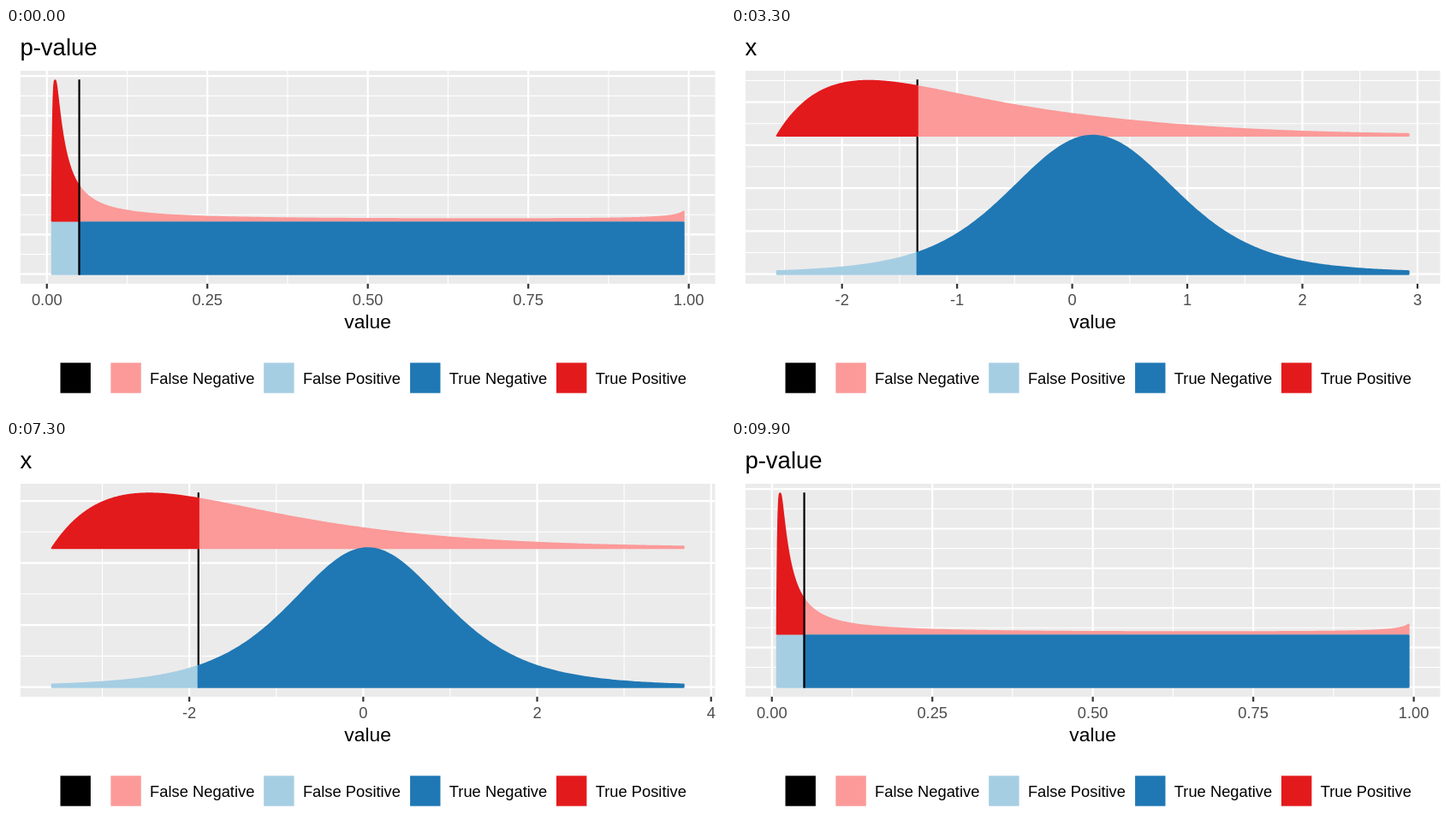
Animation, 840 px wide and 450 px high, one loop 10000 ms. Source, as an HTML page:

```html
<!DOCTYPE html>
<html lang="en">
<head>
<meta charset="utf-8">
<title>p-value</title>
<style>
  html, body { margin: 0; width: 100%; height: 100%; overflow: hidden; background: #fff; }
  svg { display: block; }
  text { font-family: "Liberation Sans", Arial, sans-serif; font-size: 18.33px; }
  .title { font-size: 27.5px; }
  .label { font-size: 22.9px; }
  .tick { fill: #4d4d4d; text-anchor: middle; }
</style>
</head>
<body>
<svg width="840" height="450" viewBox="0 0 840 450">
  <text class="title" id="title" x="16.4" y="32"></text>
  <g id="plot"></g>
  <text class="label" x="422.7" y="351" text-anchor="middle">value</text>
  <g id="legend"></g>
</svg>
<script>
const FALSE_NEG = '#FB9A99', FALSE_POS = '#A6CEE3', TRUE_NEG = '#1F78B4', TRUE_POS = '#E31A1C';
const LINE = 2.2;
const panel = { left: 16.9, right: 828.5, top: 50, bottom: 298.9 };
const byId = id => document.getElementById(id);
const mix = (a, b, e) => a + (b - a) * e;

// Student t with 4 degrees of freedom against a gamma(2, 0.8) that starts at -4.
const tShape = x => (1 + x * x / 4) ** -2.5;
const tCdf = x => {
  const s = 1 + x * x / 4;
  return 0.5 + 0.375 * x / Math.sqrt(s) * (1 - x * x / s / 12);
};
const altShape = x => 0.8 * (x + 4) * Math.exp(1 - 0.8 * (x + 4));

// Each curve as [height on the p-value scale, height on the x scale].
const nullHeight = x => [0.01302, 2.5 * tShape(x)];
const altBase = [0.01342, 2.5];
const altHeight = x => [
  altBase[0] + 0.00146 * altShape(x) / tShape(x),
  altBase[1] + 0.981 * altShape(x)
];
const total = [0.0489, 3.481];
const MIN = -4, CUT = -2.124, MAX = 4;

// Step and ends of the best axis labels (Talbot's extended Wilkinson search, five wanted).
function axisBreaks(lo, hi) {
  const nice = [1, 5, 2, 2.5, 4, 3], span = hi - lo;
  let best = { score: -Infinity };
  nice.forEach((q, i) => {
    for (let count = 2; count <= 10; count++) {
      const first = Math.ceil(Math.log10(span / (count + 1) / q));
      for (let z = first; z < first + 2; z++) {
        const step = q * 10 ** z;
        const last = Math.ceil(lo / step);
        for (let n = Math.floor(hi / step) - count + 1; n <= last; n++) {
          const from = n * step, to = (n + count - 1) * step;
          const simplicity = (from <= 0 && to >= 0 ? 1 : 0) - i / 5;
          const coverage = 1 - 0.5 * ((hi - to) ** 2 + (lo - from) ** 2) / (0.1 * span) ** 2;
          const ratio = (count - 1) / (to - from) * (Math.max(to, hi) - Math.min(from, lo)) / 4;
          const density = 2 - Math.max(ratio, 1 / ratio);
          const score = 0.25 * simplicity + 0.2 * coverage + 0.5 * density;
          if (score > best.score) best = { score, step };
        }
      }
    }
  });
  return best.step;
}

function multiples(step, lo, hi) {
  const list = [];
  for (let n = Math.ceil(lo / step); n * step <= hi; n++) list.push(n);
  return list;
}

function decimals(step) {
  let d = 0;
  while (Math.abs(step * 10 ** d - Math.round(step * 10 ** d)) > 1e-6) d++;
  return d;
}

const segment = (x1, y1, x2, y2, color, width) =>
  `<path d="M${x1} ${y1}L${x2} ${y2}" stroke="${color}" stroke-width="${width}"/>`;

function drawPlot(e, lineOnTop) {
  const { left, right, top, bottom } = panel;
  const lo = mix(tCdf(MIN), MIN, e), hi = mix(tCdf(MAX), MAX, e), high = mix(...total, e);
  const scaleX = (right - left) / 1.1 / (hi - lo), scaleY = (bottom - top) / 1.1 / high;
  const padX = (hi - lo) * 0.05, padY = high * 0.05;
  const px = v => left + (v - lo + padX) * scaleX;
  const py = v => bottom - (v + padY) * scaleY;
  const xAt = x => px(mix(tCdf(x), x, e)).toFixed(2);
  const yAt = heights => py(mix(...heights, e)).toFixed(2);

  const stepX = axisBreaks(lo, hi), stepY = axisBreaks(0, high);
  const nx = multiples(stepX / 2, lo - padX, hi + padX);
  const ny = multiples(stepY / 2, -padY, high + padY);
  let svg = `<rect x="${left}" y="${top}" width="${right - left}" height="${bottom - top}" fill="#EBEBEB"/>`;
  for (const odd of [1, 0]) {
    const width = odd ? LINE / 2 : LINE;
    for (const n of ny) if (Math.abs(n % 2) === odd) {
      const y = py(n * stepY / 2);
      svg += segment(left, y, right, y, '#fff', width);
    }
    for (const n of nx) if (Math.abs(n % 2) === odd) {
      const x = px(n * stepX / 2);
      svg += segment(x, top, x, bottom, '#fff', width);
    }
  }

  const area = (from, to, height, base, color) => {
    const count = 200, points = [];
    for (let i = 0; i <= count; i++) {
      const x = mix(from, to, i / count);
      points.push(xAt(x) + ' ' + yAt(height(x)));
    }
    points.push(xAt(to) + ' ' + yAt(base), xAt(from) + ' ' + yAt(base));
    return `<path d="M${points.join('L')}Z" fill="${color}" stroke="${color}" stroke-width="${LINE}" stroke-linejoin="round"/>`;
  };
  const areas =
    area(CUT, MAX, altHeight, altBase, FALSE_NEG) +
    area(MIN, CUT, nullHeight, [0, 0], FALSE_POS) +
    area(CUT, MAX, nullHeight, [0, 0], TRUE_NEG) +
    area(MIN, CUT, altHeight, altBase, TRUE_POS);
  const cut = `<g stroke-linecap="square">${segment(xAt(CUT), py(0), xAt(CUT), py(high), '#000', LINE)}</g>`;
  svg += lineOnTop ? areas + cut : cut + areas;

  const places = decimals(stepX);
  for (const n of nx) if (n % 2 === 0) {
    const value = n / 2 * stepX, x = px(value);
    svg += segment(x, bottom, x, bottom + 5.7, '#333', LINE);
    svg += `<text class="tick" x="${x}" y="324">${(value || 0).toFixed(places)}</text>`;
  }
  byId('plot').innerHTML = svg;
}

byId('legend').innerHTML = [
  [63.5, '#000', ''],
  [122.4, FALSE_NEG, 'False Negative'],
  [301.2, FALSE_POS, 'False Positive'],
  [472.1, TRUE_NEG, 'True Negative'],
  [643, TRUE_POS, 'True Positive']
].map(([x, color, name]) =>
  `<rect x="${x}" y="391.3" width="35.4" height="35.4" fill="${color}"/><text x="${x + 45.7}" y="416">${name}</text>`
).join('');

const ease = t => t < 0.5 ? 4 * t ** 3 : 1 - 4 * (1 - t) ** 3;
const ramp = (v, from, to) => ease(Math.min(1, Math.max(0, (v - from) / (to - from))));

let shown = -1;
function render(now) {
  const tick = Math.floor(now % 10000 / 100);
  if (tick !== shown) {
    shown = tick;
    const e = ramp(tick, 12, 50) - ramp(tick, 62, 99);
    byId('title').textContent = tick >= 31 && tick < 81 ? 'x' : 'p-value';
    drawPlot(e, e === 0 || e === 1);
  }
}
const start = performance.now();
function loop() {
  render(performance.now() - start);
  requestAnimationFrame(loop);
}
loop();
</script>
</body>
</html>
```
